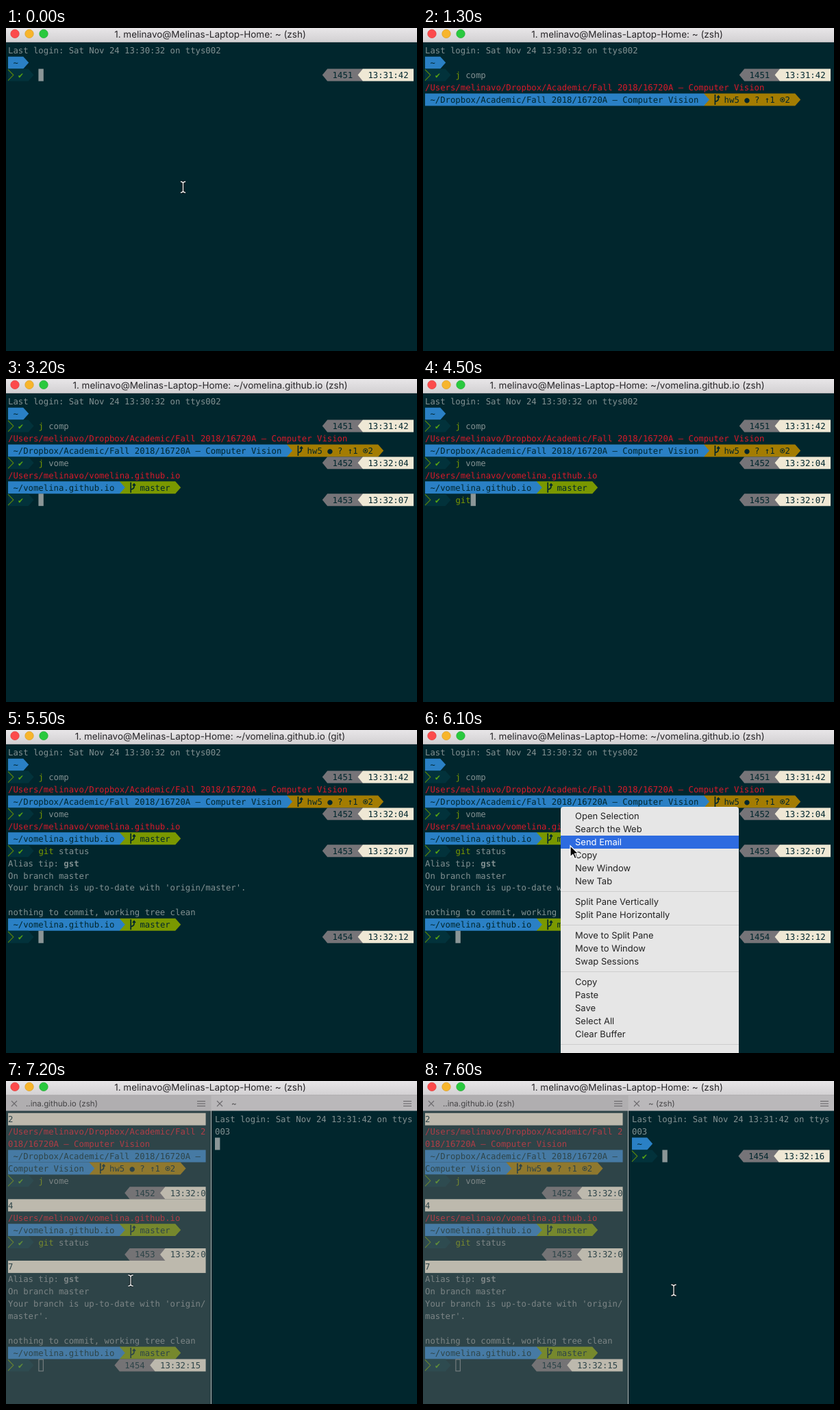
Recreate the animation shown at these times as an HTML page. Size 600 by 471 pixels, loop 7700 ms.

```html
<!DOCTYPE html>
<html lang="en">
<head>
<meta charset="utf-8">
<title>Terminal</title>
<style>
html, body { margin: 0; width: 100%; height: 100%; overflow: hidden; background: #01262d; }
svg { display: block; width: 100vw; height: 100vh; }
text { white-space: pre; text-rendering: geometricPrecision; }
.mono { font: 12.292px "DejaVu Sans Mono", "Liberation Mono", monospace; }
.title { font: 13.5px Inter, Roboto, sans-serif; text-anchor: middle; fill: #272528; }
.tab { font: 11.6px Inter, Roboto, sans-serif; fill: #454446; }
.item { font: 13px Inter, Roboto, sans-serif; }
</style>
</head>
<body>
<svg id="stage" viewBox="0 0 600 471" preserveAspectRatio="none">
  <defs>
    <linearGradient id="chrome" x2="0" y2="1">
      <stop offset="0" stop-color="#e8e6e8"/><stop offset="1" stop-color="#d2d0d2"/>
    </linearGradient>
  </defs>
  <g id="view"></g>
</svg>
<script>
const LOOP = 7700, STEP = 100;
const CELL = 7.4, ROW = 17.94;
const BG = '#01262d', INK = '#839192', DARK = '#02323b', BLUE = '#2a80c5', GREEN = '#7a9800',
      GOLD = '#a37c02', RED = '#d81a2a', CREAM = '#efe8d5', GREY = '#767478', CURSOR = '#8b9697';

const USER = 'melinavo', SITE = 'vomelina.github.io';
const COURSE = 'Dropbox/Academic/Fall 2018/16720A – Computer Vision';
const HOST = `1. ${USER}@Melinas-Laptop-Home: `;

const rect = (x, y, w, h, fill, more = '') =>
  `<rect x="${x}" y="${y}" width="${w}" height="${h}" fill="${fill}" ${more}/>`;
const shape = (d, fill, more = '') => `<path d="${d}" fill="${fill}" ${more}/>`;
const line = (d, color, width, more = '') =>
  shape(d, 'none', `stroke="${color}" stroke-width="${width}" ${more}`);
const label = (cls, x, y, s, more = '') => `<text class="${cls}" x="${x}" y="${y}" ${more}>${s}</text>`;

// Character grid with its top left corner at x0, y0
function grid(x0, y0) {
  const X = c => +(x0 + c * CELL).toFixed(2);
  const Y = r => +(y0 + r * ROW).toFixed(2);
  const g = {};

  g.text = (r, c, s, fill = INK) => label('mono', X(c), Y(r) + 13.4, s, `fill="${fill}"`);
  g.fill = (r, c, end, fill) => rect(X(c), Y(r), X(end) - X(c), ROW, fill);
  g.bar = (r, c, end, fill) =>
    shape(`M${X(c)} ${Y(r)}H${X(end)}l${CELL + 0.6} ${ROW / 2}l${-CELL - 0.6} ${ROW / 2}H${X(c)}z`, fill);
  g.flag = (r, c, end, fill) =>
    shape(`M${X(c)} ${Y(r) + ROW / 2}l${CELL} ${-ROW / 2}H${X(end)}v${ROW}H${X(c + 1)}z`, fill);

  g.branch = (r, c) => line(
    `M${X(c) + 1.6} ${Y(r) + 1.5}v15M${X(c) + 1.6} ${Y(r) + 12}q4.8 -1 4.8 -4.5v-3` +
    `m-2 1.6l2 -2.4l2 2.4`, BG, 1.7);

  g.dir = (r, end, s, col = 1) => g.bar(r, 0, end, BLUE) + g.text(r, col, s, BG);
  g.home = r => g.dir(r, 3, '~');

  g.site = r => g.bar(r, 22, 33, GREEN) + g.dir(r, 22, '~/' + SITE) +
    g.branch(r, 24) + g.text(r, 26, 'master', BG);

  g.course = (r, c, s, col) => {
    const cx = X(c + 15) + 3.7, cy = Y(r) + 9.2;
    return g.bar(r, c, c + 18, GOLD) + g.dir(r, c, s, col) + g.branch(r, c + 2) +
      g.text(r, c + 4, 'hw5 ● ? ↑1', BG) +
      `<circle cx="${cx}" cy="${cy}" r="3.1" fill="none" stroke="${BG}"/>` +
      `<circle cx="${cx}" cy="${cy}" r="1.3" fill="${BG}"/>` + g.text(r, c + 16, '2', BG);
  };

  g.status = (r, c, num, time, end = c + 18) =>
    g.flag(r, c, c + 8, GREY) + g.flag(r, c + 7, end, CREAM) +
    g.text(r, c + 2, num, BG) + g.text(r, c + 9, time.slice(0, end - c - 9), BG);

  g.prompt = (r, cmd = '', n = cmd.length) => {
    const cut = cmd.indexOf(' ');
    const head = cmd.slice(0, Math.min(n, cut)), tail = cmd.slice(cut + 1, n);
    return g.bar(r, 0, 4, DARK) +
      line(`M${X(0)} ${Y(r) + 1}l${CELL + 0.4} 8l${-CELL - 0.4} 8`, '#5f8a08', 1.1) +
      g.text(r, 2, '✔', '#58a512') +
      (head ? g.text(r, 6, head, GREEN) : '') + (tail ? g.text(r, 7 + cut, tail) : '');
  };

  g.cursor = (r, c, under = '') =>
    rect(X(c), Y(r), CELL, ROW, CURSOR) + (under.trim() ? g.text(r, c, under, BG) : '');
  g.hollow = (r, c) =>
    rect(X(c) + 0.5, Y(r) + 0.5, CELL - 1, ROW - 1, 'none', `stroke="${CURSOR}"`);
  g.tip = r => g.text(r, 0, 'Alias tip: <tspan font-weight="bold">gst</tspan>');
  return g;
}

const full = grid(3, 23.7), left = grid(3, 46.7), right = grid(305, 46.7);

// Each command: row, text, key times, return, output, new prompt
const commands = [
  { row: 2, cmd: 'j comp', keys: [200, 400, 800, 900, 1000, 1100], enter: 1200, out: 1300, next: 1400,
    num: '1451', time: '13:31:42' },
  { row: 5, cmd: 'j ' + SITE.slice(0, 4), keys: [1900, 2100, 2200, 2300, 2500, 2600],
    enter: 2800, out: 2900, next: 3000, num: '1452', time: '13:32:04' },
  { row: 8, cmd: 'git status', keys: [4200, 4300, 4500, 4600, 4700, 4700, 4800, 4900, 5000, 5000],
    enter: 5100, out: 5200, next: 5300, num: '1453', time: '13:32:07' }
];

const output = [
  () => full.text(3, 0, `/Users/${USER}/${COURSE}`, RED) + full.course(4, 55, '~/' + COURSE),
  () => full.text(6, 0, `/Users/${USER}/${SITE}`, RED) + full.site(7),
  () => full.text(10, 0, 'On branch master') +
    full.text(11, 0, "Your branch is up-to-date with 'origin/master'.") +
    full.text(13, 0, 'nothing to commit, working tree clean') + full.site(14)
];

function single(t) {
  let s = full.text(0, 0, 'Last login: Sat Nov 24 13:30:32 on ttys002') + full.home(1);
  commands.forEach((k, i) => {
    if (i && t < commands[i - 1].next) return;
    const n = k.keys.filter(at => at <= t).length;
    s += full.prompt(k.row, k.cmd, n) + full.status(k.row, 62, k.num, k.time);
    if (t < k.enter) s += full.cursor(k.row, 6 + n, n ? k.cmd[n] : '');
    else if (t < k.out) s += full.cursor(k.row + (i === 2 ? 2 : 1), 0);
    if (i === 2 && t >= k.enter) s += full.tip(9);
    if (t >= k.out) s += output[i]();
  });
  if (t >= 5300) s += full.prompt(15) + full.status(15, 62, '1454', '13:32:12') + full.cursor(15, 6);
  return s;
}

function tabBar(x, w, fill, name) {
  const end = x + w - 20;
  return rect(x, 21, w, 22.5, fill) +
    line(`M${x + 8} 29l8 8m0 -8l-8 8`, '#6c6a6d', 1.1) +
    label('tab', x + 29, 37, name) +
    line(`M${end} 29.5h12m-12 3.5h12m-12 3.5h12`, '#636164', 1.2);
}

function split(t) {
  const wrapped = (r, num, time) => left.status(r, 23, num, time, 39) +
    left.fill(r + 1, 0, 39, CREAM) + left.text(r + 1, 0, time[7], BG);
  const path = `/Users/${USER}/${COURSE}`, dir = '~/' + COURSE;
  const [, second, third] = commands;
  const ready = t >= 7400;

  let s = left.fill(0, 0, 39, CREAM) + left.text(0, 0, '2', BG) +
    left.text(1, 0, path.slice(0, 39), RED) + left.text(2, 0, path.slice(39), RED) +
    left.fill(3, 0, 39, BLUE) + left.text(3, 1, dir.slice(0, 37), BG) +
    left.course(4, 16, dir.slice(38), 0) +
    left.prompt(5, second.cmd) + wrapped(6, second.num, second.time) +
    left.text(8, 0, `/Users/${USER}/${SITE}`, RED) + left.site(9) +
    left.prompt(10, third.cmd) + wrapped(11, third.num, third.time) +
    left.tip(13) + left.text(14, 0, 'On branch master') +
    left.text(15, 0, "Your branch is up-to-date with 'origin/") + left.text(16, 0, "master'.") +
    left.text(18, 0, 'nothing to commit, working tree clean') + left.site(19) +
    left.prompt(20) + left.status(20, 21, '1454', '13:32:15') + left.hollow(20, 6);
  s += rect(0, 43, 299, 428, '#717171', 'opacity=".4"');

  if (t >= 6900) s += right.text(0, 0, 'Last login: Sat Nov 24 13:31:42 on ttys') + right.text(1, 0, '003');
  s += ready
    ? right.home(2) + right.prompt(3) + right.status(3, 21, '1454', '13:32:16') + right.cursor(3, 6)
    : right.cursor(t >= 6900 ? 2 : 0, 0);

  return s + tabBar(0, 299, '#b0aeb0', `..${SITE.slice(5)} (zsh)`) +
    tabBar(300, 300, '#bab8ba', ready ? '~ (zsh)' : '~') +
    rect(299, 21, 1, 450, '#b3b3b3');
}

function titleBar(t) {
  let x = 298, s = '~ (zsh)';
  if (t >= 1400 && t < 3000) { x = 325.5; s = '~/Dropbox/Academic/Fall 2018/16720A - Co…'; }
  else if (t >= 3000 && t < 6800) s = `~/${SITE} (${t >= 5100 && t < 5700 ? 'git' : 'zsh'})`;
  const lights = [['#fc4b4c', '#dd3d3c'], ['#f7b52c', '#d99c22'], ['#29c93e', '#22a635']];
  return rect(0, 0, 600, 21, 'url(#chrome)') + line('M0 20.5H600', '#b2b0b2', 1) +
    lights.map(([fill, edge], i) =>
      `<circle cx="${13 + 21 * i}" cy="8.4" r="6.2" fill="${fill}" stroke="${edge}" stroke-width=".7"/>`).join('') +
    label('title', x, 14, HOST + s);
}

const items = ['Open Selection', 'Search the Web', 'Send Email', 'Copy', 'New Window', 'New Tab', '',
  'Split Pane Vertically', 'Split Pane Horizontally', '', 'Move to Split Pane', 'Move to Window',
  'Swap Sessions', '', 'Copy', 'Paste', 'Save', 'Select All', 'Clear Buffer', ''];

function menu(t) {
  if (t < 5900 || t > 6600) return '';
  const alpha = t < 6500 ? 1 : t < 6600 ? 0.4 : 0.04;
  const my = mouseAt(t)[1];
  let y = 116, s = rect(201, 112, 260, 370, '#e6e6e6', 'rx="4"');
  for (const name of items) {
    const h = name ? 19 : 11, on = name && my >= y && my < y + h;
    if (on) s += rect(201, y, 260, h, '#2d6be0');
    s += name ? label('item', 222, y + 14, name, `fill="${on ? '#fff' : '#222'}"`)
              : line(`M201 ${y + 5.5}h260`, '#cdcdcd', 1);
    y += h;
  }
  return `<g opacity="${alpha}">${s}</g>`;
}

const track = [[5700, 258.5, 232], [5900, 201, 114], [6400, 236, 251], [6700, 236, 251],
  [7200, 182, 291], [7600, 366, 305]];

function mouseAt(t) {
  let i = 1;
  while (i < track.length - 1 && track[i][0] < t) i++;
  const [a, b] = [track[i - 1], track[i]];
  const k = Math.min(1, Math.max(0, (t - a[0]) / (b[0] - a[0])));
  return [a[1] + (b[1] - a[1]) * k, a[2] + (b[2] - a[2]) * k];
}

function mouse(t) {
  if (t >= 100 && t < 5700) return '';
  const [x, y] = mouseAt(t);
  const beam = 'M-3.6 -8q2.9 0 3.6 2.2q.7 -2.2 3.6 -2.2M0 -6V6M-3.6 8q2.9 0 3.6 -2.2q.7 2.2 3.6 2.2';
  const arrow = 'M0 0V16.2l3.8 -3.6l2.7 6.2l2.7 -1.2l-2.7 -6h5.2z';
  const art = t >= 5900 && t < 6800
    ? shape(arrow, '#050505', 'stroke="#fff" stroke-width="1.2"')
    : line(beam, '#0a1214', 3) + line(beam, '#eef0f0', 1.3);
  return `<g transform="translate(${x.toFixed(1)} ${y.toFixed(1)})">${art}</g>`;
}

const view = document.getElementById('view');
let shown = -1;

function tick(now) {
  const t = Math.floor((now % LOOP) / STEP) * STEP;
  if (t !== shown) {
    shown = t;
    view.innerHTML = rect(0, 0, 600, 471, BG) + (t < 6800 ? single(t) : split(t)) +
      titleBar(t) + menu(t) + mouse(t);
  }
  requestAnimationFrame(tick);
}
tick(performance.now());
</script>
</body>
</html>
```
